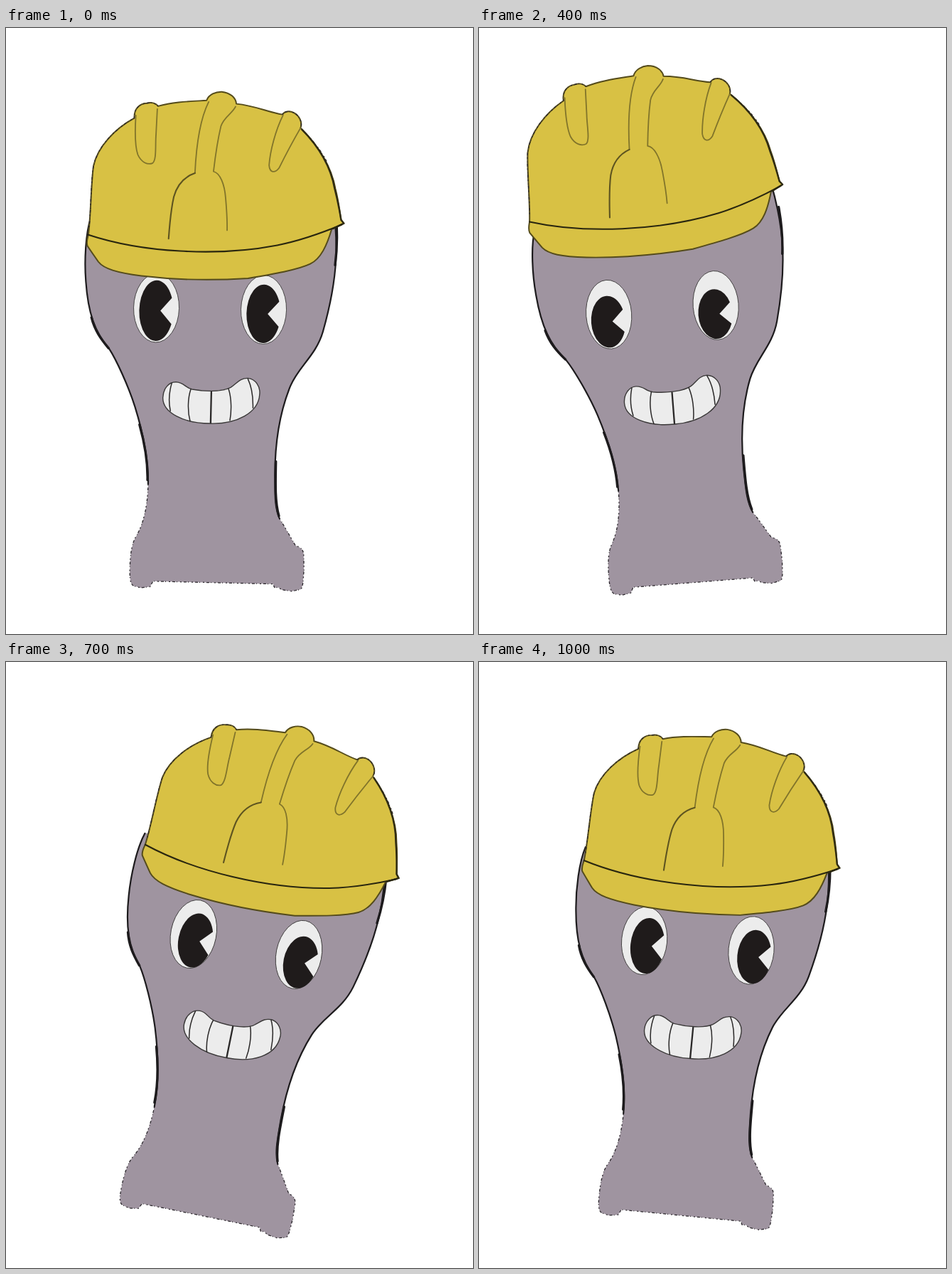
These frames come from a looping animation (657 px wide and 852 px high, 1.1 s). An HTML page:

```html
<!DOCTYPE html>
<html lang="en">
<head>
<meta charset="utf-8">
<title>Dancing brush with a hard hat</title>
<style>
  html, body { margin: 0; width: 100%; height: 100%; overflow: hidden; background: #fff; }
  svg { display: block; width: 657px; height: 852px; }
  path { fill: none; stroke-linecap: round; stroke-linejoin: round; }
  .skin { fill: #9f94a0; }
  .side { stroke: #1d1b1d; stroke-width: 2.2; }
  .shade { stroke: #1d1b1d; stroke-width: 3.4; }
  .rough { stroke: #2b272c; stroke-width: 1.3; stroke-dasharray: 2 3 4 2 1 4; stroke-linecap: butt; }
  .white { fill: #ececec; stroke: #3a3838; stroke-width: .9; }
  .pupil { fill: #1f1b1b; }
  .tooth { stroke: #2a2828; stroke-width: 1.5; }
  .shell { fill: #d8c144; stroke: #544b1b; stroke-width: 2; }
  .rim { stroke: #29260f; stroke-width: 2.1; }
  .rib { stroke: #81742a; stroke-width: 1.8; }
  .fold { stroke: #5e5420; stroke-width: 2.1; }
</style>
</head>
<body>
<svg viewBox="0 0 657 852">
  <g id="figure">
    <path class="skin" id="skin"/>
    <path class="side" id="left"/>
    <path class="side" id="right"/>
    <path class="rough" id="base"/>
    <path class="shade" d="M114 402C119 421 128 433 139 446M185 556C192 580 198 610 198 636M455 250C458 280 457 300 455 318M378 605C378 640 378 664 384 684"/>

    <ellipse class="white" cx="205" cy="386" rx="32" ry="50"/>
    <ellipse class="white" cx="356" cy="385" rx="32" ry="50"/>
    <path class="pupil" id="pupilL"/>
    <path class="pupil" id="pupilR"/>

    <path class="white" style="stroke-width:1.4" d="M217 516C217 503 225 493 235 493C246 493 248 501 258 503C275 506 300 506 312 499C320 494 324 485 336 485C347 486 354 497 353 508C352 535 322 552 285 552C248 553 217 538 217 516Z"/>
    <path class="tooth" d="M229 495C225 510 225 522 228 535M256 503C252 516 252 535 256 549M309 501C314 515 314 535 312 547M336 486C342 498 344 512 344 528"/>
    <path class="tooth" style="stroke-width:2.3" d="M285 506V551"/>

    <g id="hat">
      <path class="shell" d="M104 233C107 205 106 160 109 133C114 105 138 78 165 62C164 48 172 41 182 40C189 38 195 40 198 44C220 37 243 36 266 34C269 25 279 21 287 21C299 22 307 29 308 38C335 40 352 49 373 52C376 47 383 46 389 49C397 53 402 63 399 71C425 96 444 127 450 158C455 176 457 192 459 203L463 208L446 217C440 240 432 260 417 268C400 277 365 284 330 291C285 295 230 296 180 291C145 287 127 282 119 272C112 262 107 255 103 249C101 243 103 238 104 233Z"/>
      <path class="rough" d="M105 222C107 185 106 155 109 133C114 105 138 78 165 62C164 48 172 41 182 40C189 38 195 40 198 44M373 52C376 47 383 46 389 49C397 53 402 63 399 71C417 88 430 105 437 119"/>
      <path class="side" style="stroke-width:2.4;stroke:#302c14" d="M401 73C425 97 443 127 449 158C454 176 457 192 459 203L463 208L448 216"/>
      <path class="rim" d="M104 233C180 257 285 261 370 242C405 234 436 221 460 210"/>
      <path class="rib" d="M167 58C166 84 167 104 171 115C176 126 185 130 192 127C198 122 195 100 196 85L197 48M269 36C258 60 253 95 252 140M307 42C303 52 291 57 287 71C282 95 280 115 278 137C287 139 294 154 296 176C298 195 299 210 299 222M374 53C364 75 357 105 356 126C357 137 364 138 370 130C380 108 391 86 399 71"/>
      <path class="fold" d="M252 140C239 145 228 155 223 175C219 195 218 215 217 236"/>
    </g>
  </g>
</svg>
<script>
const $ = id => document.getElementById(id);
const set = (id, name, value) => $(id).setAttribute(name, value);

const left = "M110 257C103 280 102 320 105 350C109 395 119 423 140 447C150 462 168 500 178 530C190 567 199 605 199 642";
const base = "C199 680 192 703 184 718C178 728 176 745 176 765C176 780 177 790 184 791L192 793L205 791L209 783H378L380 788L386 788L390 791L404 793L417 790C421 785 420 772 421 762L420 738C418 729 413 729 408 726C400 713 393 700 385 688";
const right = "C377 670 378 650 377 625C376 570 383 530 396 495C407 466 431 450 440 415C447 387 455 345 456 310C457 280 453 245 447 215";
set("skin", "d", left + base + right + "Z");
set("left", "d", left);
set("base", "d", "M199 642" + base);
set("right", "d", "M385 688" + right);

// Unit circle with a wedge cut out on the right
for (const id of ["pupilL", "pupilR"]) set(id, "d", "M.9-.43A1 1 0 1 0 .9 .43L.24 0Z");

const STEP = 100;
// tilt in degrees, stretch, hat x, hat y, pupil height, pupil x
const poses = [
  [1.3, .968, 3, 49, 44, 0],
  [-2.9, .925, 3, 52, 44, -2.4],
  [-6.6, .925, 2, 42, 43, -3.6],
  [-8.6, .94, 0, 24, 41, -4.2],
  [-4.5, .97, 0, 10, 37.5, -1.5],
  [0, 1, 0, 0, 34, 1.5],
  [5.7, .986, 5, 20, 36.5, 3.2],
  [11.4, .972, 9.5, 40, 39.5, 4.5],
  [17.4, 1.052, 12, 31, 42.7, 5.6],
  [11.4, 1, 9, 37, 42, 5.4],
  [5.5, .956, 5.7, 44, 41, 5.2]
];

// Pupils shrink towards the lower edge of the eye
function look(id, x, y, dx, ry) {
  set(id, "transform", `translate(${x + dx} ${y + 48 - ry}) scale(24 ${ry})`);
}

function draw(now) {
  const [tilt, stretch, hatX, hatY, ry, dx] = poses[Math.floor(now / STEP) % poses.length];
  set("figure", "transform", `translate(293.5 683) rotate(${tilt}) scale(1 ${stretch}) translate(-293.5 -683)`);
  set("hat", "transform", `translate(${hatX} ${hatY})`);
  look("pupilL", 205, 386, dx, ry);
  look("pupilR", 356, 385.5, dx, ry - 1.5);
}

const start = performance.now();
function tick() {
  draw(performance.now() - start);
  requestAnimationFrame(tick);
}
tick();
</script>
</body>
</html>
```
